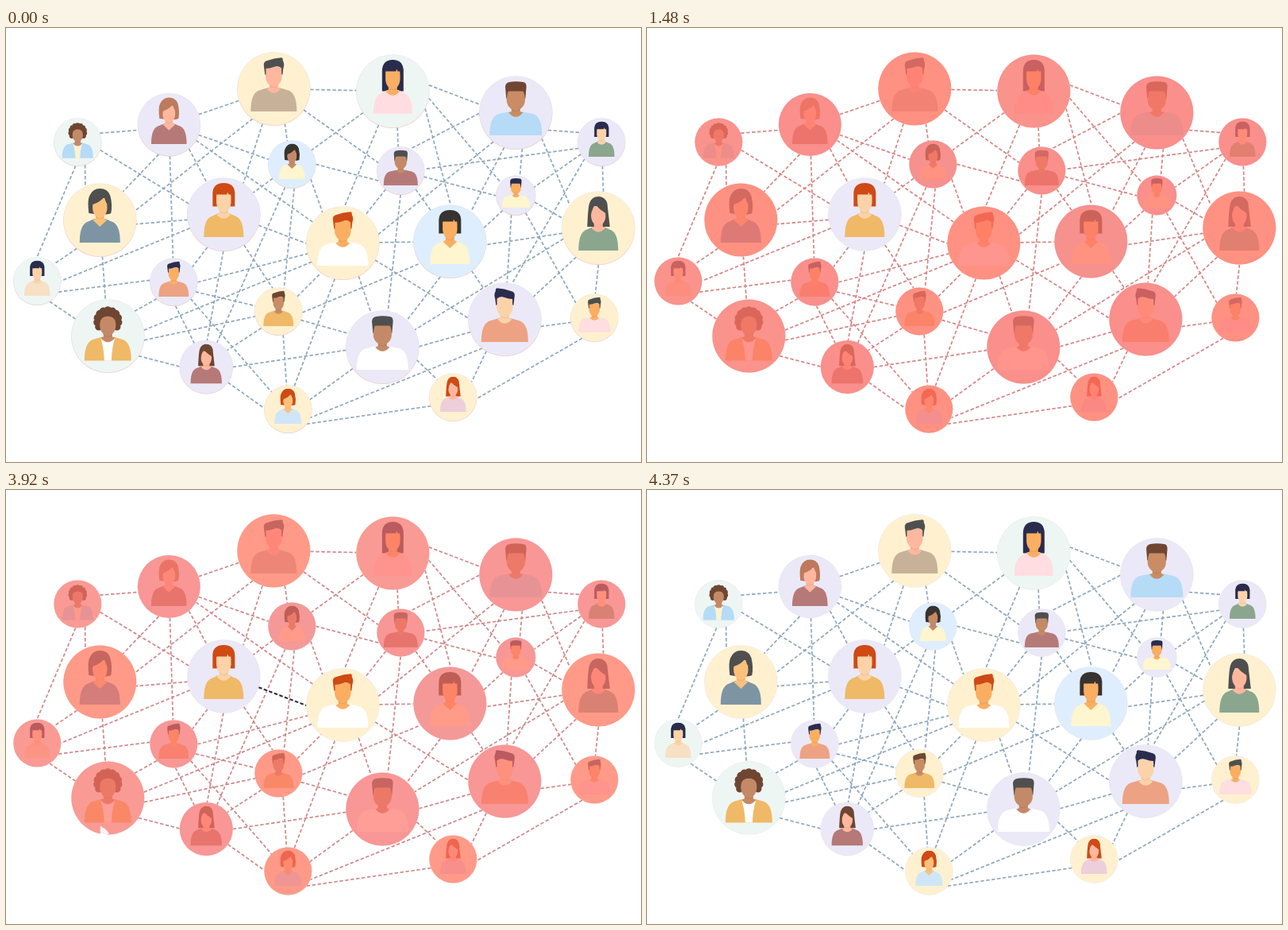
Animation of 800 by 546 pixels, one loop 5370 ms. Source, as an HTML page:

```html
<!DOCTYPE html>
<html lang="en">
<head>
<meta charset="utf-8">
<title>People network</title>
<style>
  html, body { margin: 0; height: 100%; overflow: hidden; background: #fff; }
  svg { display: block; width: 800px; height: 546px; }
  #links, #bond { fill: none; stroke-width: 1.7; stroke-dasharray: 4.4 2.6; }
  #bond { stroke: #1b2140; stroke-width: 2; }
  #rims { fill: #f6c6ba; }
  #veil, #veilB { fill: rgb(255, 114, 104); }
</style>
</head>
<body>
<svg viewBox="0 0 800 546">
  <g transform="translate(.3 .5)">
    <path id="links"/>
    <path id="bond"/>
    <g id="rims"></g>
    <g id="people"></g>
    <g id="veil"></g>
    <g id="veilB"></g>
    <path id="gap" d="M118.5 422q2 2 5 3q4 3 6 7l-5 2l-6-1z" fill="#fbfdfc"/>
  </g>
</svg>
<script>
const LOOP = 5370, STEP = 30;
const $ = id => document.getElementById(id);

const backs = { cream: '#fff1d0', lilac: '#ebe9f7', mint: '#eef6f4', sky: '#deeeff' };
const skins = { dark: '#c48a67', tan: '#c98c64', pink: '#ffb79e', gold: '#faae62', light: '#fcd3a8', sand: '#fbc07c' };
const hairs = { navy: '#2a2c4d', grey: '#4f4f4f', brown: '#6e4632', red: '#cf4a14', rose: '#bd7a5e', black: '#37332f' };
const shirts = {
  blue: '#b5dbf7', wine: '#b57a78', sand: '#c7b299', blush: '#ffdde0', green: '#8aa68f', slate: '#7d95a3',
  lemon: '#fff5cf', amber: '#efb967', white: '#ffffff', peach: '#f7e0c3', coral: '#eda283', mauve: '#eccfda', ice: '#cfe6f8'
};

// x, y, radius, backdrop, shoulder half-width, hair cut, hair, skin, shirt
const people = `
90 143 30 mint 30 curly brown dark blue
205 121 39.5 lilac 26 bob rose pink wine
337 76 46 cream 29 quiff grey pink sand
487 79 46 mint 24.5 longFringe navy gold blush
642 106 46 lilac 33 flat brown tan blue
750 143 30 lilac 25 fringe navy light green
118 241 46 cream 25.5 bob grey sand slate
360 171 30 sky 25 bob black dark lemon
497 179 30 lilac 33 flat grey dark wine
642 210 25 lilac 32 flat navy gold lemon
746 251 46 cream 25 long grey pink green
274 234 46 lilac 25 fringe red light amber
424 270 46 cream 32 quiff red gold white
559 268 46 sky 25 fringeV black gold lemon
39 318 30 mint 25 fringe navy light peach
211 319 30 lilac 29 quiff navy gold coral
128 387 46 mint 29.5 curly brown dark amber
343 356 30 cream 29 quiff brown tan amber
474 401 46 lilac 32.5 flat grey dark white
628 366 46 lilac 29.5 quiffL navy light coral
741 364 30 cream 31 quiff grey gold blush
252 426 33.5 lilac 27 long brown pink wine
355 479 30 cream 26 bob red sand ice
563 464 30 cream 25 long red pink mauve`.trim().split('\n').map(row => {
  const [x, y, r, back, w, cut, hair, skin, shirt] = row.split(' ');
  return { x: +x, y: +y, r: +r, back, w: +w, cut, hair, skin, shirt };
});

// Pairs of people (A is the first), each with an optional sideways shift at either end
const links = `AB-9+4 AO+10-13 AG+9-18 AL-7+13 BC BH+0+4 BM-4+0 BL+9+0 BP BG+23-5 CG+17+23 CL+0+12 CH+8-2
CI+0+10 CD DH DM+0-17 DI+4-2 DN+35+13 DJ-44+6 DE-25+7 EI-23-21 EM+14+25 EN+8+7 EJ+12+3 EF+19-10
EK+19-24 FI+4+2 FJ-3+6 FT-9-17 FK+0+8 JK-5+14 JU+0-13 JT-4+0 JN+4+22 KN+0+11 KT+11+5 KS-13+3 KU+5-2
TU+15+2 IN+2+4 IM IS+3+2 IJ+0+7 HI-8+20 HM+17-12 HL HR+6+4 HV+4+0 LG+3+9 LO+0+12 LM-3+18 LP+11+9 LR+0+12
LV+8-5 GO+16-7 GQ OP+17-6 OQ+15+6 PQ+9-12 PR+6+0 PM+8+2 PV-13+0 PW+3-2 QM+11+8 QR+15+0 QV+15+8 RM+5+10
RN+14+12 RS+3-5 RV+7-4 RW+4+0 MW+7-3 MS+6+0 MN MT-4+27 NS+22+5 NT+2+0 SV-3+5 ST+12+4 SW+0+8 SX-25-3
TW+25+22 TX-4+14 WX+22+7 VW+0+20 UX+17+19`.split(/\s+/);

// Runs from rim to rim, so the dashes start at the circle's edge
function linkPath(code) {
  const [, a, b, da = 0, db = 0] = code.match(/(.)(.)([+-]\d+)?([+-]\d+)?/);
  const [p, q] = [a, b].map(c => people[c.charCodeAt(0) - 65]);
  const flat = Math.abs(p.x - q.x) > Math.abs(p.y - q.y);
  const shifted = (n, d) => flat ? [n.x, n.y + +d] : [n.x + +d, n.y];
  const from = shifted(p, da), to = shifted(q, db);
  const leave = (s, e, n) => {
    const dx = e[0] - s[0], dy = e[1] - s[1], len = Math.hypot(dx, dy);
    const ox = s[0] - n.x, oy = s[1] - n.y;
    const along = (ox * dx + oy * dy) / len;
    const run = Math.sqrt(Math.max(0, along * along - ox * ox - oy * oy + n.r * n.r)) - along;
    return [s[0] + dx * run / len, s[1] + dy * run / len].map(v => v.toFixed(1));
  };
  return `M${leave(from, to, p)}L${leave(to, from, q)}`;
}

const dot = (x, y, r) => `M${x - r} ${y}a${r} ${r} 0 1 0 ${2 * r} 0a${r} ${r} 0 1 0 ${-2 * r} 0`;
const curls = Array.from({ length: 11 }, (_, i) => {
  const a = Math.PI * (.82 + 1.36 * i / 10);
  return dot(13.5 * Math.cos(a), 18 + 13.5 * Math.sin(a), 4.8);
}).join('') + dot(0, 18, 13);

const bangs = 'M-11 24L-9 14.5H4L5 11L6 14.5H9L11 24L13 12Q11 1 0 1Q-11 1-13 12z';
const bobBack = 'M-14 29.5V12Q-13 0 0 0Q13 0 14 12V29.5z';
const quiff = 'M-11 22L-12.5 10Q-13 5-8 4Q0 1 10 .3Q12 1 11.5 4Q14 8 12 14L11 22L9.8 21V13.5Q6 10 0 12Q-5 14-9.8 14V21z';

// Each cut: hair behind the body, hair over the face, half-width of the face
const cuts = {
  quiff: ['', quiff, 10.3],
  quiffL: ['', quiff, 10.3],
  flat: ['', 'M-12 22L-13.3 7Q-13 2-8 1Q0-.5 9 1Q13.3 1 13.3 7L12 22L11.3 21Q11 14 9 12.5H-9Q-11 14-11.3 21z', 11.6],
  bob: ['M-14 31Q-16 14-13 9Q-9 0 0 0Q10 0 13 9Q16 20 14 31Q8 34-14 31z',
        'M-10 27L-9 20Q1 17 5.5 10Q7 17 9 19L10 27L13 10Q8 1 0 1Q-10 1-13 12z', 9.2],
  fringe: [bobBack, bangs, 9.2],
  fringeV: [bobBack, bangs, 9.2],
  long: ['M-14 38Q-13 12-11 8Q-8 0 0 0Q8 0 11 8Q13 25 14.5 38z',
         'M-10 27Q-9 17-4 10Q2 17 9 21L10 27L11 10Q8 1 0 1Q-9 1-11 10z', 9.2],
  longFringe: ['M-13.5 39.5V14Q-13 0 0 0Q13 0 13.5 14V39.5z', bangs, 9.2],
  curly: [curls, 'M-10.5 22Q-9 12 0 12Q9 12 10.5 22L13 14Q8 5 0 5Q-8 5-13 14z', 10]
};

function figure({ x, y, r, w, cut, hair, skin, shirt }) {
  const k = r / 46, [behind, over, f] = cuts[cut];
  const fill = (d, color) => d && `<path d="${d}" fill="${color}"/>`;
  const tone = skins[skin], curly = cut === 'curly', deep = cut === 'bob' || cut === 'fringeV';
  const side = w - 12;
  const body = `M${-w} 68C${-w} 51 ${4 - w} 43 ${-side} 41L-7 38H7L${side} 41C${w - 4} 43 ${w} 51 ${w} 68z`;
  const neck = `M-5.5 28V38L-9 39.5${deep ? 'L0 48L9 39.5' : 'Q0 50 9 39.5'}L5.5 38V28z`;
  const top = curly ? fill('M-9 40Q0 45 9 40Q5 52 4.5 68H-4.5Q-5 52-9 40z', r > 40 ? '#fff' : '#fff3cf') : '';
  const flip = cut === 'quiffL' ? -1 : 1;
  const lift = curly ? 37 : 39.6;
  return `<g transform="translate(${x} ${y - lift * k}) scale(${flip * k} ${k})">` +
    fill(behind, hairs[hair]) + fill(body, shirts[shirt]) + top + fill(neck, tone) +
    fill('M-5.5 33V37Q0 40 5.5 37V33z', '#0000000d') +
    fill(`M${-f} 12V24C${-f} 32-4 37 0 37S${f} 32 ${f} 24V12z`, tone) +
    fill(over, hairs[hair]) + '</g>';
}

const disc = ({ x, y, r }, extra = '') => `<circle cx="${x}" cy="${y}" r="${r}" ${extra}/>`;
const [first, second] = [people[11], people[12]];

$('links').setAttribute('d', links.map(linkPath).join(''));
$('bond').setAttribute('d', linkPath('LM-3+18'));
$('rims').innerHTML = people.map(p => disc({ ...p, y: p.y + .6 })).join('');
$('people').innerHTML = people.map(p =>
  disc(p, `fill="${backs[p.back]}" stroke="#dcd6dc" stroke-width=".3"`) + figure(p)).join('');
$('veil').innerHTML = people.filter(p => p !== first && p !== second).map(p => disc(p)).join('');
$('veilB').innerHTML = disc(second);

const calm = [141, 167, 188], alarm = [214, 132, 132];

function draw() {
  const t = performance.now() % LOOP;
  // Stepped fade; head is how far into its first step it already is
  const fade = (start, head) => {
    const n = Math.floor((t - start) / STEP);
    return n < 0 ? 0 : Math.min(1, (n + head) / (14 + head));
  };
  const meet = fade(2140, 1), clear = 1 - fade(3920, 1.4), red = fade(1060, .6) * clear;
  const opacity = (id, v) => $(id).setAttribute('opacity', v);
  opacity('veil', .75 * red);
  opacity('veilB', .75 * red * (1 - meet));
  opacity('bond', meet * clear);
  opacity('gap', meet * clear);
  opacity('rims', t < 1480 ? 1 : 0);
  $('links').setAttribute('stroke', `rgb(${calm.map((c, i) => Math.round(c + (alarm[i] - c) * red))})`);
  requestAnimationFrame(draw);
}
draw();
</script>
</body>
</html>
```
